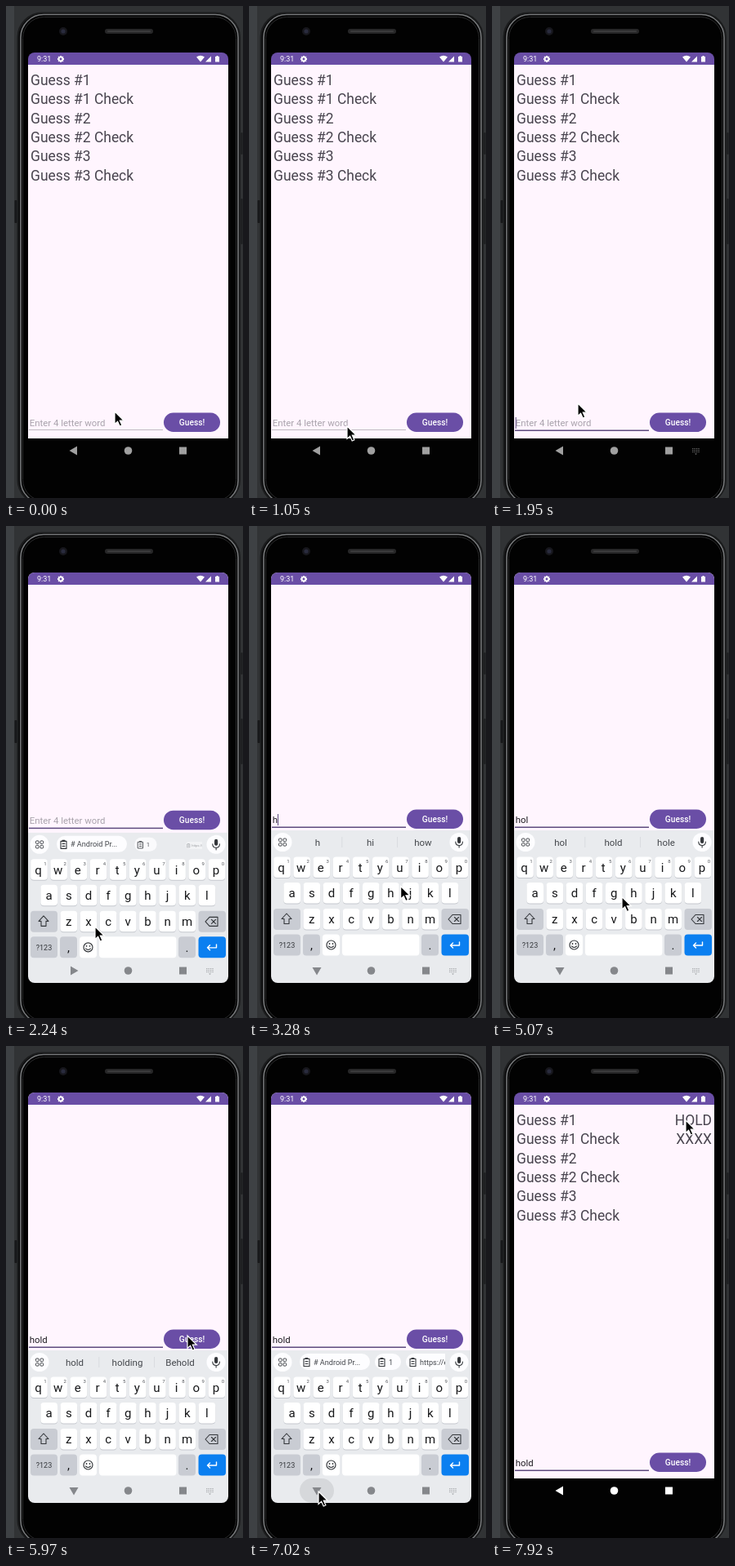
An HTML page for the animation above (8 s loop, 290 by 603 pixels).

```html
<!DOCTYPE html>
<html lang="en">
<head>
<meta charset="utf-8">
<title>Word guess</title>
<style>
  html, body { margin: 0; width: 100%; height: 100%; overflow: hidden; background: #313335; }
  svg { display: block; width: 100vw; height: 100vh; font-family: Roboto, sans-serif; }
  .list { font-size: 17.45px; fill: #49454f; }
  .field { font-size: 11.4px; fill: #1d1b20; }
  .button { font-size: 10.2px; font-weight: 500; fill: #fff; }
  .key { font-size: 15px; fill: #17181a; }
  .hint { font-size: 6px; fill: #55585d; }
  .suggestion { font-size: 11.5px; fill: #44474c; }
  .chip { font-size: 9.1px; fill: #44474c; }
  .mid { text-anchor: middle; }
  .end { text-anchor: end; }
  .line { fill: none; stroke: #34373b; stroke-width: 1.1; stroke-linejoin: round; stroke-linecap: round; }
</style>
</head>
<body>
<svg id="stage" viewBox="0 0 290 603"></svg>
<script>
const LOOP = 8000;
const stage = document.getElementById('stage');
const $ = id => document.getElementById(id);
const range = n => [...Array(n).keys()];
const rect = (x, y, w, h, fill, r = 0, more = '') =>
  `<rect x="${x}" y="${y}" width="${w}" height="${h}" rx="${r}" fill="${fill}" ${more}/>`;
const circle = (x, y, r, fill, more = '') => `<circle cx="${x}" cy="${y}" r="${r}" fill="${fill}" ${more}/>`;
const text = (x, y, cls, s, more = '') => `<text x="${x}" y="${y}" class="${cls}" ${more}>${s}</text>`;
const line = (d, more = '') => `<path class="line" d="${d}" ${more}/>`;
const group = (id, body, more = '') => `<g id="${id}" ${more}>${body}</g>`;

function phone() {
  return rect(0, 0, 10, 603, '#3e4144') + rect(10, 0, 280, 603, '#313335') +
    rect(10.5, 238, 3, 28, '#17181a', 1) +
    rect(287.5, 155, 2, 27, '#1b1c1e', 1) + rect(287.5, 236, 2, 56, '#1b1c1e', 1) +
    rect(14.5, 8.5, 271.5, 602, '#0b0b0c', 30, 'stroke="#1b1c1d" stroke-width="2"') +
    rect(18, 10.5, 266, 599, '#000', 28, 'stroke="#77797b" stroke-width="1.6"') +
    rect(20.5, 13.5, 261, 593, '#020202', 26, 'stroke="#2b2c2d" stroke-width="1"') +
    circle(70, 31, 5, '#17171c') + circle(70, 31, 2.6, '#292b3d') +
    rect(121, 28, 59, 6, '#272728', 3) + rect(124, 30, 53, 2, '#3b3b3c', 1);
}

function content() {
  const rows = range(6).map(i =>
    text(30, 97 + i * 23.33, 'list', `Guess #${(i >> 1) + 1}${i % 2 ? ' Check' : ''}`)).join('');
  const result = text(269, 97, 'list end', 'HOLD') + text(269, 120.3, 'list end', 'XXXX');
  return rect(27, 72, 245, 650, '#fff5fe') + rows + group('result', result) +
    text(28.8, 515, 'field', '', 'id="entry"') +
    rect(29, 504, 1, 14, '#5d4a7e', 0, 'id="caret"') +
    rect(28, 519, 164, 1, '#c0bac2', 0, 'id="underline"') +
    rect(193, 498.5, 69, 23.5, '#6a4ea6', 11.75, 'id="button"') +
    text(227.5, 514.3, 'button mid', 'Guess!');
}

function status() {
  const teeth = range(8).map(i => rect(66, 61, 2, 2, '#fff', 0, `transform="rotate(${i * 45} 67 65)"`)).join('');
  return rect(27, 57, 245, 15, '#6a4ea6') +
    text(38, 68, '', '9:31', 'font-size="9" fill="#fff"') +
    teeth + circle(67, 65, 2.2, 'none', 'stroke="#fff" stroke-width="1.6"') +
    '<path fill="#fff" d="M233 62.5q5-3.6 10 0l-5 6zM244 68.5l7-7v7zM256 62h1.5v-1h2v1h1.5v6.5h-5z"/>';
}

function keyRow(letters, x, y, numbered) {
  return [...letters].map((c, i) => {
    const cx = x + i * 24.15;
    return rect(cx - 10.3, y + 1, 20.6, 25.5, '#c5c8ce', 4) +
      rect(cx - 10.3, y, 20.6, 25.5, '#fff', 4, `id="key-${c}"`) +
      text(cx - (numbered ? 1 : 0), y + 18.4, 'key mid', c) +
      (numbered ? text(cx + 7.5, y + 7.5, 'hint mid', (i + 1) % 10) : '');
  }).join('');
}

function chip(i, x, w, label) {
  const cy = 387.5, ix = x + 5;
  const clipboard = line(`M${ix} ${cy - 4}h7v9h-7zM${ix + 2} ${cy - 5}h3M${ix + 2} ${cy - 1}h3M${ix + 2} ${cy + 2}h3`);
  return group('chip' + i, rect(x, 377, w, 20, '#fdfdff', 10) + clipboard + text(x + 17, 390.6, 'chip', label),
    `style="transform-origin:${x + w - 10}px 390px"`);
}

function keyboard() {
  const grey = '#c9ccd3';
  const chips = chip(0, 62, 86, '# Android Pr...') + chip(1, 154, 32, '1') +
    `<g clip-path="url(#strip)">${chip(2, 192, 60, 'https://ex')}</g>`;
  const suggestions = range(3).map(i => text(84 + i * 64.5, 391.5, 'suggestion mid', '', `id="word${i}"`)).join('') +
    rect(113.5, 381, .7, 13, '#d3d5da') + rect(181, 381, .7, 13, '#d3d5da');
  const tools = circle(41, 387.5, 11.5, '#fdfdff') +
    range(4).map(i => rect(36.5 + (i % 2) * 5.5, 383 + (i >> 1) * 5.5, 3.6, 3.6, 'none', 1, 'stroke="#44474c"')).join('') +
    circle(257, 387.5, 11.5, '#fdfdff') + rect(255, 381, 4.2, 8, '#34373b', 2.1) +
    line('M252.8 387q0 4.5 4.3 4.5t4.3-4.5M257.1 392v2');
  const special = [[30, 469, 33], [235.5, 469, 33.5], [30, 500.5, 33], [66, 500.5, 21], [211, 500.5, 21]]
    .map(([x, y, w]) => rect(x, y, w, 26, grey, 4)).join('');
  return rect(27, 373, 245, 230, '#e9ebee') + tools + group('chips', chips) + group('words', suggestions) +
    keyRow('qwertyuiop', 40.5, 405.5, true) + keyRow('asdfghjkl', 52.7, 437) + keyRow('zxcvbnm', 76.8, 469) +
    special + rect(90, 500.5, 21, 26, '#fff', 4) + rect(114, 500.5, 94.5, 26, '#fff', 4) +
    rect(235.5, 500.5, 33.5, 26, '#0b7ff0', 4) +
    line('M46 475l6 6.5h-3v6h-6v-6h-3z') +
    line('M244 482l5-5.5h10v11h-10zM251.5 479.5l5 5M256.5 479.5l-5 5') +
    text(46.5, 517, 'mid', '?123', 'font-size="9" fill="#34373b"') +
    text(76.5, 519, 'key mid', ',') + text(221.5, 519, 'key mid', '.') +
    circle(100.5, 513.5, 5.5, 'none', 'stroke="#34373b" stroke-width="1.2"') +
    circle(98.5, 512, .9, '#34373b') + circle(102.5, 512, .9, '#34373b') + line('M97.5 515q3 3 6 0') +
    line('M257.5 510v4h-11M249.5 511l-3 3 3 3', 'style="stroke:#fff;stroke-width:1.4"');
}

function nav() {
  const dots = range(12).map(i => rect(245.2 + (i % 4) * 2.4, 542 + (i >> 2) * 2, 1.2, 1.1, 'currentColor')).join('');
  return rect(62, 530, 42, 30, '#d6d8db', 15, 'id="ripple"') +
    '<path id="back" fill="currentColor" d="M77.5 545l9.5-5.5v11z"/>' +
    circle(149.5, 545, 4.8, 'currentColor') + rect(212, 540.5, 9, 9, 'currentColor') +
    group('imeIcon', dots + '<path fill="currentColor" d="M248 548.5h3l-1.5 1.5z"/>', 'opacity=".75"');
}

stage.innerHTML = `<defs>
    <clipPath id="screen">${rect(27, 57, 245, 503, '#000', 8)}</clipPath>
    <clipPath id="app">${rect(27, 57, 245, 473, '#000')}</clipPath>
    <clipPath id="strip">${rect(192, 374, 48, 30, '#000')}</clipPath>
  </defs>` + phone() +
  `<g clip-path="url(#screen)"><g clip-path="url(#app)">${group('content', content())}</g>
   ${status()}${group('keyboard', keyboard())}${group('nav', nav())}</g>` +
  '<path id="pointer" d="M0 0v15.5l3.6-3.3 2.6 5.8 2.7-1.2-2.6-5.6h5z" fill="#000" stroke="#fff" stroke-width="1.2"/>';

// time, x, y of the pointer tip
const path = [
  [300, 133, 497], [600, 142, 514], [1050, 120, 515], [1350, 104, 513], [1650, 104, 510],
  [1950, 105, 487], [2240, 109, 491], [2540, 136, 457], [2990, 147, 457], [3570, 227, 425],
  [3870, 228, 424], [4320, 247, 433], [4470, 246, 453], [4620, 240, 454], [4770, 216, 455],
  [5370, 102, 454], [5520, 112, 450], [5820, 213, 372], [5970, 222, 355], [6270, 222, 358],
  [6870, 84, 545], [7020, 85, 546], [7320, 86, 545], [7920, 237, 91]
];
// time, entered text, suggestions
const edits = [
  [1650, ''], [2990, 'h', 'h', 'hi', 'how'], [3870, 'ho', 'ho', 'how', 'Ho'],
  [4470, 'hol', 'hol', 'hold', 'hole'], [5370, 'hold', 'hold', 'holding', 'Behold']
];
const presses = { h: 2840, o: 3720, l: 4320, d: 5220 };

const clamp = v => Math.min(1, Math.max(0, v));
const between = (t, a, b) => t >= a && t < b;
const show = (id, on) => $(id).setAttribute('visibility', on ? 'visible' : 'hidden');

function step(t) {
  if (t < 450) return 0;
  const start = t < 2090 ? 450 : t < 3130 ? 2090 : t < 3270 ? 3130 : 3270;
  return start + Math.floor((t - start) / 150) * 150;
}

function pointerAt(t) {
  const i = path.findIndex(p => p[0] > t);
  if (i === 0) return path[0].slice(1);
  if (i < 0) return path[path.length - 1].slice(1);
  const [a, b] = [path[i - 1], path[i]];
  const u = (t - a[0]) / (b[0] - a[0]);
  return [a[1] + (b[1] - a[1]) * u, a[2] + (b[2] - a[2]) * u];
}

function draw(t) {
  const focused = t >= 1650;
  const hiding = clamp((t - 7170) / 300);
  const open = t < 7170 ? 1 - (1 - clamp((t - 1950) / 385)) ** 3 : 1 - hiding * hiding * (3 - 2 * hiding);
  const edit = edits.filter(e => e[0] <= t).pop() || [0, ''];
  const value = edit[1];

  // The page pans a little ahead of the keyboard.
  $('content').setAttribute('transform', `translate(0 ${-151 * Math.sqrt(open)})`);
  $('keyboard').setAttribute('transform', `translate(0 ${190 * (1 - open)})`);
  show('keyboard', open > 0);
  show('result', t >= 6120);

  const entry = $('entry');
  entry.textContent = value || 'Enter 4 letter word';
  entry.style.fill = value ? '#1d1b20' : '#a9a3ac';
  $('caret').setAttribute('x', 28.7 + (value ? entry.getComputedTextLength() : 0));
  show('caret', focused && (t - edit[0]) % 1000 < 500);
  $('underline').setAttribute('fill', focused ? '#5d4a7e' : '#c0bac2');
  $('underline').setAttribute('y', focused ? 519.5 : 519);
  $('underline').setAttribute('height', focused ? 1.5 : 1);
  $('button').setAttribute('fill', between(t, 6120, 6420) ? '#8168b4' : '#6a4ea6');

  const suggesting = value && t < 6270;
  $('words').style.display = suggesting ? '' : 'none';
  $('chips').style.display = suggesting ? 'none' : '';
  range(3).forEach(i => {
    $('word' + i).textContent = edit[2 + i] || '';
    const grow = i && t < 6000 ? clamp((t - 2090) / 150 - i * .4 + .25) : 1;
    $('chip' + i).style.transform = `scale(${grow})`;
    $('chip' + i).style.opacity = grow;
  });
  for (const key in presses)
    $('key-' + key).setAttribute('fill', between(t, presses[key], presses[key] + 150) ? '#e3e5e9' : '#fff');

  $('nav').style.color = open > .5 ? '#85878b' : t > 7170 ? '#fff' : '#a0a0a0';
  const turn = t < 7170 ? 270 * clamp((t - 1950) / 435) : 270 + 90 * hiding;
  $('back').setAttribute('transform', `rotate(${turn} 83 545)`);
  show('ripple', between(t, 6870, 7170));
  show('imeIcon', between(t, 1800, 7320));
  $('pointer').setAttribute('transform', `translate(${pointerAt(t)})`);
}

function tick(now) {
  draw(step(now % LOOP));
  requestAnimationFrame(tick);
}
tick(performance.now());
</script>
</body>
</html>
```
